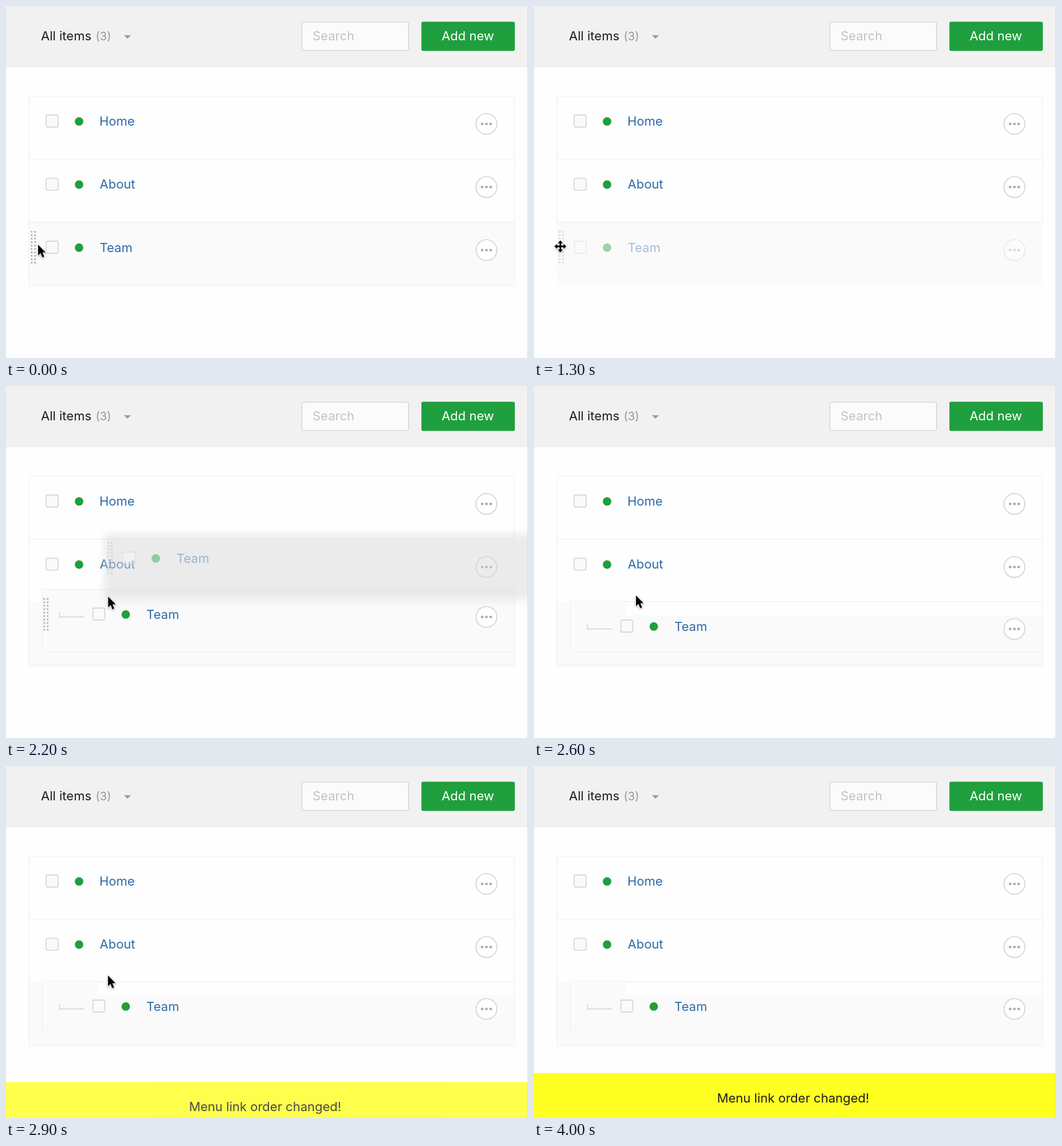
An HTML page that plays this animation: 911 px wide and 615 px high, repeating every 4.83 s.

```html
<!DOCTYPE html>
<html lang="en">
<head>
<meta charset="utf-8">
<title>Reorder list</title>
<style>
  html, body { margin: 0; width: 100%; height: 100%; overflow: hidden; background: #fefefe; }
  svg { display: block; width: 911px; height: 615px; }
  text { font: 22px Inter, "Liberation Sans", sans-serif; fill: #1d1d1d; }
  .link { fill: #2d6ba9; }
  .line { fill: none; stroke: #eee; }
  .soft { filter: blur(6px); }
</style>
</head>
<body>
<svg viewBox="0 0 911 615">
  <defs>
    <g id="label">
      <rect x="30" y="33.5" width="21" height="21" rx="2.5" fill="#fafafa" stroke="#cdcdcd" stroke-width="1.3"/>
      <circle cx="87.5" cy="44.7" r="7.4" fill="#1f9f3d"/>
    </g>
    <g id="menu">
      <circle cx="798.5" cy="49" r="18.2" fill="#fff" stroke="#c9c9c9" stroke-width="1.3"/>
      <g fill="#a6a6a6">
        <circle cx="791" cy="49" r="2.2"/><circle cx="798.5" cy="49" r="2.2"/><circle cx="806" cy="49" r="2.2"/>
      </g>
    </g>
    <path id="grip" d="M4.7 15.5V73M10.7 15.5V73" stroke="#b7b7b7" stroke-width="3" stroke-dasharray="3 3"/>
    <g id="team">
      <use href="#label"/>
      <text class="link" x="123.5" y="52.5">Team</text>
    </g>
  </defs>

  <rect width="911" height="107" fill="#f1f1f1"/>
  <text x="61" y="60">All items</text>
  <text x="156.5" y="59.5" style="font-size:20px;fill:#959595">(3)</text>
  <path d="M206 51h12l-6 6.3z" fill="#9c9c9c"/>
  <rect x="516.5" y="28.5" width="186" height="49" rx="2.5" fill="#fbfbfb" stroke="#cfcfcf" stroke-width="1.2"/>
  <text x="535" y="60" style="fill:#c3c3c3">Search</text>
  <rect x="725" y="27.5" width="163" height="51" rx="3" fill="#1f9f3d"/>
  <text x="806" y="60" text-anchor="middle" style="fill:#fff">Add new</text>

  <rect x="40" y="378" width="847" height="110" fill="#fafafa"/>
  <path class="line" d="M39.5 378V157.500H887.500V378M39.5 267.500H887.500"/>
  <path class="line" id="outer" d="M39.500 378V488.500H887.500V378"/>

  <g transform="translate(40 157)">
    <use href="#label"/><use href="#menu"/>
    <text class="link" x="123" y="52">Home</text>
  </g>
  <g transform="translate(40 267.300)">
    <use href="#label"/><use href="#menu"/>
    <text class="link" x="123.500" y="52">About</text>
  </g>

  <g id="flat">
    <path class="line" d="M39.500 377.800H887.500"/>
    <g id="fade" transform="translate(40 377.500)">
      <use href="#grip"/><use href="#team"/><use href="#menu"/>
    </g>
  </g>

  <rect id="patch" x="160" y="377" width="727" height="23" fill="#fefefe"/>
  <g id="nested">
    <rect id="fill" width="824" height="110" fill="#fafafa"/>
    <path id="frame" class="line"/>
    <use id="nestGrip" href="#grip" x="-1"/>
    <path d="M30.500 40V48.500H73" fill="none" stroke="#cfcfcf" stroke-width="1.300"/>
    <use href="#team" x="58.500" y="-0.500"/>
    <use href="#menu" x="-23" y="-0.500"/>
  </g>

  <g id="ghost">
    <rect class="soft" x="36" y="378" width="900" height="125" rx="8" fill="#d4d4d4" opacity=".14"/>
    <rect class="soft" x="38" y="380" width="900" height="112" rx="4" fill="#d8d8d8" opacity=".38"/>
    <g transform="translate(40 377.500)" opacity=".42">
      <use href="#grip"/><use href="#team"/>
    </g>
  </g>

  <g id="toast">
    <rect width="911" height="79" fill="#ffff22"/>
    <text x="452.300" y="51" text-anchor="middle">Menu link order changed!</text>
  </g>
  <path d="M910.500 0V615" stroke="#dcdcdc"/>

  <path id="arrow" d="M0 0V18.800L4.300 14.800L7.400 22.200L10.700 20.800L7.600 13.600H13.200Z"
        fill="#000" stroke="#fff" stroke-width="1.700" paint-order="stroke"
        style="filter:drop-shadow(0 1px 1.500px rgba(0,0,0,.35))"/>
  <path id="cross" d="M0-10.500L4.500-5.500H1.500V-1.500H5.500V-4.500L10.500 0L5.500 4.500V1.500H1.500V5.500H4.500L0 10.500L-4.500 5.500H-1.500V1.500H-5.500V4.500L-10.500 0L-5.500-4.500V-1.500H-1.500V-5.500H-4.500Z"
        fill="#000" stroke="#fff" stroke-width="2.600" paint-order="stroke" stroke-linejoin="round"
        style="filter:drop-shadow(0 1px 1px rgba(0,0,0,.3))"/>
</svg>

<script>
const LOOP = 4830, STEP = 100;
const el = id => document.getElementById(id);

// Each row: time, then values
const pointer = [
  [0, 56, 417], [100, 55, 417], [200, 51, 419], [300, 46, 420],
  [1500, 46, 420], [1600, 82, 401], [1700, 118, 386], [1800, 143, 377],
  [1900, 162, 372], [2000, 173, 369], [2100, 178, 368], [2400, 179, 368], [2500, 178, 366]
];
const drag = [
  [1600, 30, -87], [1700, 66, -102], [1800, 92, -111],
  [1900, 112, -116], [2000, 126, -119], [2100, 133, -121], [2200, 134, -121]
];
const place = [
  [1700, 51, 367], [1800, 61, 357], [1900, 63, 355],
  [2400, 63, 355], [2500, 63, 366], [2600, 63, 376]
];
const dim = [[900, 1], [1000, .8], [1100, .6], [1200, .42]];
const rise = [[2700, 0], [2800, .37], [2900, .8], [3000, 1]];

function at(table, t) {
  const i = table.findIndex(row => row[0] > t);
  if (i === 0) return table[0].slice(1);
  if (i < 0) return table[table.length - 1].slice(1);
  const a = table[i - 1], b = table[i], k = (t - a[0]) / (b[0] - a[0]);
  return a.slice(1).map((v, n) => v + (b[n + 1] - v) * k);
}
const show = (id, on) => el(id).style.display = on ? "" : "none";
const move = (id, [x, y]) => el(id).setAttribute("transform", `translate(${x} ${y})`);

function draw(t) {
  const isNested = t >= 1700, dropped = t >= 2500;
  const gripping = t >= 300 && t < 1600;

  show("flat", !isNested);
  el("fade").setAttribute("opacity", at(dim, t)[0]);
  show("outer", t < 1000 || isNested);

  show("nested", isNested);
  show("patch", dropped);
  show("fill", !dropped);
  show("nestGrip", !dropped);
  const spot = at(place, t);
  move("nested", spot);
  const h = dropped ? 465 - spot[1] : 110;
  el("frame").setAttribute("d", `M824 .5H.5V${h - .5}H824`);

  show("ghost", t >= 1600 && !dropped);
  move("ghost", at(drag, t));

  const [up] = at(rise, t);
  show("toast", up > 0);
  el("toast").setAttribute("opacity", up);
  move("toast", [0, 615 - 78.5 * up]);

  const tip = at(pointer, t);
  show("arrow", !gripping && t < 3600);
  show("cross", gripping);
  move("arrow", tip);
  move("cross", tip);
}

function tick() {
  const t = performance.now() % LOOP;
  draw(Math.floor(t / STEP) * STEP);
  requestAnimationFrame(tick);
}
tick();
</script>
</body>
</html>
```
